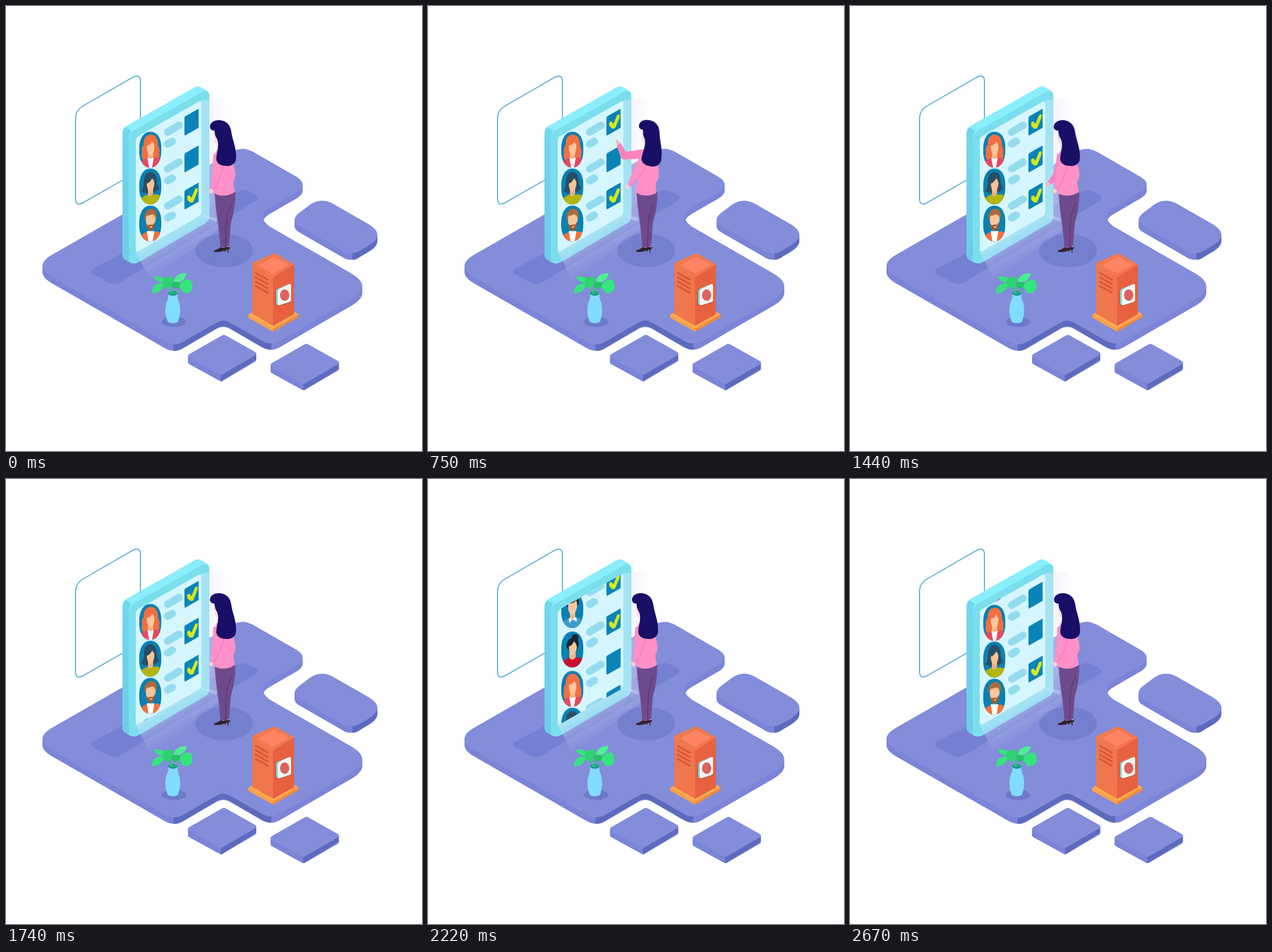
Write an HTML page that moves like this. It is 718 by 768 pixels and loops after 2.7 s.

```html
<!DOCTYPE html>
<html lang="en">
<head>
<meta charset="utf-8">
<title>Candidate list</title>
<style>
html, body { margin: 0; width: 100%; height: 100%; overflow: hidden; background: #fff; }
svg { display: block; width: 100vw; height: 100vh; }
.list, .lean, .near, .upper, .fore, .tick { animation: 2700ms ease-in-out infinite; }
.list { animation-name: scroll; }
.lean { animation-name: lean; transform-origin: 377px 312px; }
.near { animation-name: near; transform-origin: 371px 258px; }
.upper { animation-name: upper; }
.fore { animation-name: fore; }
.tick { transform-origin: 320.5px 201px; }
.t1 { animation-name: tick1; }
.t2 { animation-name: tick2; }
@keyframes scroll {
  0%, 61.11% { transform: translateY(0); animation-timing-function: cubic-bezier(.815, 0, .21, 1); }
  100% { transform: translateY(-333px); }
}
@keyframes lean {
  0%, 2.22%, 61.11%, 100% { transform: rotate(0); }
  22.22% { transform: rotate(8deg); }
  42.22% { transform: rotate(-.7deg); }
}
@keyframes near {
  0%, 2.22%, 61.11%, 100% { transform: rotate(0); }
  22.22% { transform: rotate(11deg); }
  42.22% { transform: rotate(1.5deg); }
}
@keyframes upper {
  0%, 2.22%, 61.11%, 100% { transform: rotate(95deg); }
  22.22% { transform: rotate(178deg); }
  42.22% { transform: rotate(113deg); }
}
@keyframes fore {
  0%, 2.22%, 61.11%, 100% { transform: rotate(8deg); }
  22.22% { transform: rotate(70deg); }
  42.22% { transform: rotate(78deg); }
}
@keyframes tick1 {
  0%, 20% { transform: scale(0); }
  23.5%, 100% { transform: scale(1); }
}
@keyframes tick2 {
  0%, 42.22% { transform: scale(0); }
  45.7%, 100% { transform: scale(1); }
}
</style>
</head>
<body>
<svg viewBox="0 0 718 768">
  <defs>
    <linearGradient id="beamSide" gradientUnits="userSpaceOnUse" x1="337" y1="0" x2="378" y2="0">
      <stop offset="0" stop-color="#d4eefb" stop-opacity=".45"/>
      <stop offset=".4" stop-color="#e4e4fb" stop-opacity=".4"/>
      <stop offset="1" stop-color="#f0effc" stop-opacity=".2"/>
    </linearGradient>
    <linearGradient id="beamLow" gradientUnits="userSpaceOnUse" x1="280" y1="393" x2="307" y2="441">
      <stop offset="0" stop-color="#d8e8fc" stop-opacity=".5"/>
      <stop offset="1" stop-color="#c4c8f2" stop-opacity="0"/>
    </linearGradient>
    <linearGradient id="edge" x1="0" y1="0" x2="0" y2="1">
      <stop offset="0" stop-color="#72d8ec"/>
      <stop offset="1" stop-color="#6ecbe8"/>
    </linearGradient>

    <path id="floor" d="M80,429L393,250Q410,242 427,252L500,294Q524,308 500,322L455,348Q431,362 455,380.500L595,461Q635,484 595,507L474,577Q458,587 442,578L388,547Q375,539 362,547L305,580Q290,588 275,580L80,468Q46,448.500 80,429Z"/>
    <path id="pad" d="M506,357L526,342Q543,331 562,340L625,376Q657,395 625,414L611,422Q598,430 585,425L506,379.500Q490,370 506,357Z"/>
    <path id="tile" d="M316,601L372,569Q376,566 380,569L430,597Q434,600 430,603L375,635Q371,638 367,635L316,607Q312,604 316,601Z"/>

    <path id="screen" d="M224,233Q224,227 229,224L333,165Q337,163 337,168V357Q337,361 333,363L229,423Q224,426 224,420Z"/>
    <clipPath id="screenClip"><use href="#screen"/></clipPath>
    <path id="oval" d="M230,246C230,228 238,217 249,217C261,217 268,228 268,244V250C268,268 260,279 249,279C238,279 230,268 230,252Z"/>
    <clipPath id="ovalClip"><use href="#oval"/></clipPath>

    <g id="cells">
      <use href="#oval" fill="#0a80b2"/>
      <path d="M279,217.500L298.500,206M279,238L287,233.500" stroke="#93dcee" stroke-width="13" stroke-linecap="round"/>
      <path d="M308,193Q308,191 310,190L331,178Q333,177 333,179V208Q333,210 331,211L310,223Q308,224 308,222Z" fill="#0a84b8"/>
      <path d="M332.500,179V209" stroke="#6fc0da" stroke-width="1"/>
    </g>
    <path id="mark" d="M312.500,201.500L316.500,199L320,203.500L326.500,188L331,187L330.500,193L323,211L318,212L313,207Z" fill="#d6e81e"/>
    <path id="coat" d="M230,282V272Q234,266 244,262H255Q264,260 269,267V282Z"/>

    <g id="p0">
      <path d="M250,222C240,222 237,232 238,239C232,245 236,251 234,258C234,267 242,270 249,267C258,270 268,262 264,254C267,248 262,243 262,237C262,228 257,222 250,222Z" fill="#f26f42"/>
      <use href="#coat" fill="#e8485f"/>
      <path d="M244,262H255L252,279H247Z" fill="#fff"/>
      <path d="M245,252H254V260Q250,267 245,262Z" fill="#efb58a"/>
      <path d="M243,241Q250,240 252,234Q257,239 256,246Q255,256 249,258Q243,255 243,241Z" fill="#f9c79c"/>
    </g>
    <g id="p1">
      <path d="M249,223C239,224 238,235 238,242Q238,251 233,256Q243,262 249,258Q257,260 265,251Q260,246 260,237Q259,223 249,223Z" fill="#2a4d66"/>
      <use href="#coat" fill="#b3b50e"/>
      <path d="M245,252H254V260Q250,268 245,263Z" fill="#efb083"/>
      <path d="M243,243Q249,241 252,234Q257,238 256,245Q254,256 249,257Q243,254 243,243Z" fill="#f9c392"/>
    </g>
    <g id="p2">
      <use href="#coat" fill="#f2713f"/>
      <path d="M243,261H256L253,280H246Z" fill="#fff"/>
      <path d="M241,236Q241,225 250,223Q260,223 259,236L257,248Q254,259 249,260Q243,258 242,248Z" fill="#f9c69a"/>
      <path d="M239,240Q238,227 248,223Q261,220 260,237L258,240Q258,233 252,232Q246,235 243,234L241,241Z" fill="#ad6a38"/>
      <path d="M242,248L245,251Q249,249 254,250L257,245Q258,257 250,261Q243,260 242,248Z" fill="#9d5b30"/>
      <path d="M247,253.500L253,252L251,255.500Z" fill="#f9c69a"/>
    </g>
    <g id="p3">
      <use href="#coat" fill="#3f9bc8"/>
      <path d="M243,262L256,260L257,268L250,264L244,270Z" fill="#fff"/>
      <path d="M245,252H254V259L249,265L245,261Z" fill="#efb58a"/>
      <path d="M242,235Q249,226 258,232L257,244Q254,256 249,257Q243,255 242,246Z" fill="#f9c79c"/>
      <path d="M239,242Q238,227 249,222Q262,221 260,238L258,240L256,231Q250,238 243,236L241,242Z" fill="#1d2330"/>
    </g>
    <g id="p4">
      <ellipse cx="254" cy="227" rx="6" ry="5.500" fill="#1e2433"/>
      <path d="M239,243Q239,230 250,227Q261,226 260,240L257,250H243Z" fill="#1e2433"/>
      <use href="#coat" fill="#c5122f"/>
      <path d="M244,254H255V261Q250,269 244,263Z" fill="#efb58a"/>
      <path d="M243,243Q249,241 252,234Q257,238 257,246Q254,257 249,258Q243,255 243,243Z" fill="#f9c79c"/>
    </g>
  </defs>

  <!-- floor -->
  <g id="sides" fill="#7b84d7"></g>
  <path d="M289,584L375,541L458,582V593Q450,593 442,589L388,557Q375,548 362,557L305,591Q297,596 289,595Z" fill="#5d6bbe"/>
  <path d="M598,424L641,393V404Q641,415 625,424L611,433Q605,438 598,438Z" fill="#5d6bbe"/>
  <path d="M371,634L432,599V610L375,646Q373,648 371,648Z" fill="#5d6bbe"/>
  <path d="M513,649L574.500,614V626L517,661Q515,663 513,663Z" fill="#5d6bbe"/>
  <g fill="#838dda">
    <use href="#floor"/>
    <use href="#pad"/>
    <use href="#tile"/>
    <use href="#tile" x="142.500" y="15.500"/>
  </g>
  <path d="M151,453L400,320Q409,315 418,320L430,326Q438,332 430,337L197,477Q187,483 177,477L152,464Q143,458 151,453Z" fill="#7481d2"/>
  <ellipse cx="376.500" cy="422" rx="50" ry="29" fill="#7480ce"/>

  <!-- tablet -->
  <path d="M120,195Q120,180 133,172.500L219,123Q232,117 232,130V283L132,340Q120,346 120,332Z" fill="none" stroke="#64b5d5" stroke-width="2"/>
  <path d="M201,222Q201,211 208,207L326,140Q331,137 336,140L345,145Q351,149 351,156V362Q351,370 345,374L229,442Q222,446 215,443L206,438Q201,435 201,428Z" fill="#8aeefd"/>
  <path d="M201,222Q201,212 206,209L216,215Q212,222 212,230V441L206,438Q201,435 201,428Z" fill="url(#edge)"/>
  <path d="M212,231Q212,220 222,214L337,149Q351,142 351,156V362Q351,370 345,374L229,442Q222,446 212,441Z" fill="#7bdeed"/>
  <use href="#screen" fill="#d6f6ff"/>
  <g clip-path="url(#screenClip)"><g class="list" id="list"></g></g>
  <path d="M337,163L378,159V250L363,373L337,361Z" fill="url(#beamSide)"/>
  <path d="M224,425L337,361L388,370L250,474Z" fill="url(#beamLow)"/>

  <!-- plant -->
  <ellipse cx="290" cy="545" rx="21" ry="9" fill="#6d79ca"/>
  <path d="M280,496Q288,492 296,496Q295,503 299,512Q303,527 297,545Q288,550 279,545Q272,527 277,512Q281,503 280,496Z" fill="#82dcff"/>
  <ellipse cx="288" cy="496" rx="8" ry="4" fill="#16968e"/>
  <path d="M286,497Q283,482 274,477M288,497Q289,482 298,470M290,497L304,486M285,497L281,486" fill="none" stroke="#2ccf70" stroke-width="1.500"/>
  <g fill="#35e57c">
    <path d="M252,496Q252,477 273,479Q270,495 252,496Z"/>
    <path d="M255,467Q272,464 278,477Q261,480 255,467Z"/>
    <path d="M290,478Q290,461 312,461Q309,477 290,478Z" fill="#4bf090"/>
    <path d="M270,474Q278,463 288,469Q289,484 279,488Q270,484 270,474Z" fill="#2bd56d"/>
    <path d="M286,479Q296,471 302,482Q297,489 288,487Z" fill="#23c264"/>
    <path d="M299,485Q302,472 317,472Q323,477 322,488Q316,498 306,495Q303,488 299,485Z"/>
  </g>

  <!-- cabinet -->
  <path d="M418,533L461,557V562L418,538Z" fill="#ff9f45"/>
  <path d="M461,557L505,532V537L461,562Z" fill="#f58a34"/>
  <path d="M418,533L461,508L505,532L461,557Z" fill="#ffa94f"/>
  <path d="M425,445L461,466V552L425,531Z" fill="#f0764b"/>
  <path d="M461,466L497,446V532L461,552Z" fill="#e76141"/>
  <path d="M426,443L460,428Q463,426 466,428L497,446L461,468L426,447Q424,445 426,443Z" fill="#f47a4d"/>
  <path d="M433,447.500L462.500,431.500L490.500,446.500L461,463Z" fill="#fd8564" stroke="#e96c45"/>
  <path d="M430,460L453,473M430,467.500L453,480.500M430,475L453,488M430,482.500L453,495.500" stroke="#d5563a" stroke-width="3"/>
  <path d="M465,494L470,488L492,481V511L470,518L465,515Z" fill="#b84a3c"/>
  <path d="M466,493Q466,490 469,488L488,480V511L470,517L466,514Z" fill="#86d3c8"/>
  <path d="M469,493Q469,490 472,488L489,480Q492,479 492,483V507Q492,510 489,511L473,516Q469,517 469,514Z" fill="#eef6f5"/>
  <ellipse cx="481" cy="499" rx="8" ry="10" fill="#dd625c"/>

  <!-- woman -->
  <path d="M370,412H379V418H370ZM379,408H385V417H380Z" fill="#f6c9c6"/>
  <path d="M359,422Q366,420 371,416Q377,419 380,414Q384,418 386,415Q388,419 384,420L384,426H383L382,420L379,422L378,425L377,422Q368,426 359,424Z" fill="#33202f"/>
  <path d="M360,320Q378,329 395.500,320Q397,345 388,375L385,414L380,417L370,416Q369,400 365.500,372Q361,343 360,320Z" fill="#6e4a8d"/>
  <path d="M390,340Q380,358 380,380L379,416" fill="none" stroke="#533672" stroke-width="1.300"/>
  <g class="lean">
    <g transform="translate(366 256)">
      <g class="upper" fill="#fb83bc">
        <path d="M0,-8L34,-6.500V6.500L0,8Z"/>
        <circle cx="34" r="6.500"/>
        <g transform="translate(34 0)">
          <g class="fore">
            <path d="M0,-6.500Q12,-6 23,-3.500V3.500Q12,5 0,6.500Z"/>
            <path d="M22,-3.500Q28,-4 31,-1L30,1.500L27,2L22,3.500Z" fill="#fbb6c0"/>
          </g>
        </g>
      </g>
    </g>
    <path d="M359,213V226Q359,238 365,240V249H376L372,213Z" fill="#fddfe2"/>
    <path d="M366,247C382,245 393,264 396,288Q397,296 392,304L395,321Q378,332 360,324Q359,316 361,305Q356,275 360,258Q362,250 366,247Z" fill="#ff90c8"/>
    <g class="near">
      <path d="M351,317L355,314L358,318Q358,323 354,324Q350,322 351,317Z" fill="#fcd0d2"/>
      <path d="M362,256Q356,283 353,315L358,318Q369,302 377,272Q380,258 372,253Z" fill="#ff90c8"/>
      <path d="M377,272Q369,302 358,318" fill="none" stroke="#e772b0"/>
    </g>
    <path d="M352,209C352,199 364,195 374,198C384,201 388,209 389,218C391,232 398,245 397,263C397,272 388,277 380,276C370,276 362,271 363,262C364,250 369,240 364,229Q360,223 360,215Q353,215 352,209Z" fill="#190f66"/>
  </g>
</svg>
<script>
const use = (id, y, extra = '') => `<use href="#${id}" y="${y}" ${extra}/>`;

const sides = [];
for (const dy of [3, 5, 7, 9, 11]) {
  sides.push(use('floor', dy), use('pad', dy), use('tile', dy), use('tile', dy + 15.5, 'x="142.5"'));
}
document.getElementById('sides').innerHTML = sides.join('');

// The list wraps: the first three rows return at the end.
const tops = [0, 63.5, 127.5, 197, 265, 333, 396.5, 460.5];
const ticks = ['t1', 't2', 'on', 'on', 'on', '', '', 'on'];
document.getElementById('list').innerHTML = tops.map((top, i) => {
  const mark = ticks[i] && `<g class="${ticks[i] === 'on' ? '' : 'tick ' + ticks[i]}">${use('mark', 0)}</g>`;
  return `<g transform="translate(0 ${top})">${use('cells', 0)}` +
    `<g clip-path="url(#ovalClip)">${use('p' + i % 5, 0)}</g>${mark}</g>`;
}).join('');
</script>
</body>
</html>
```
